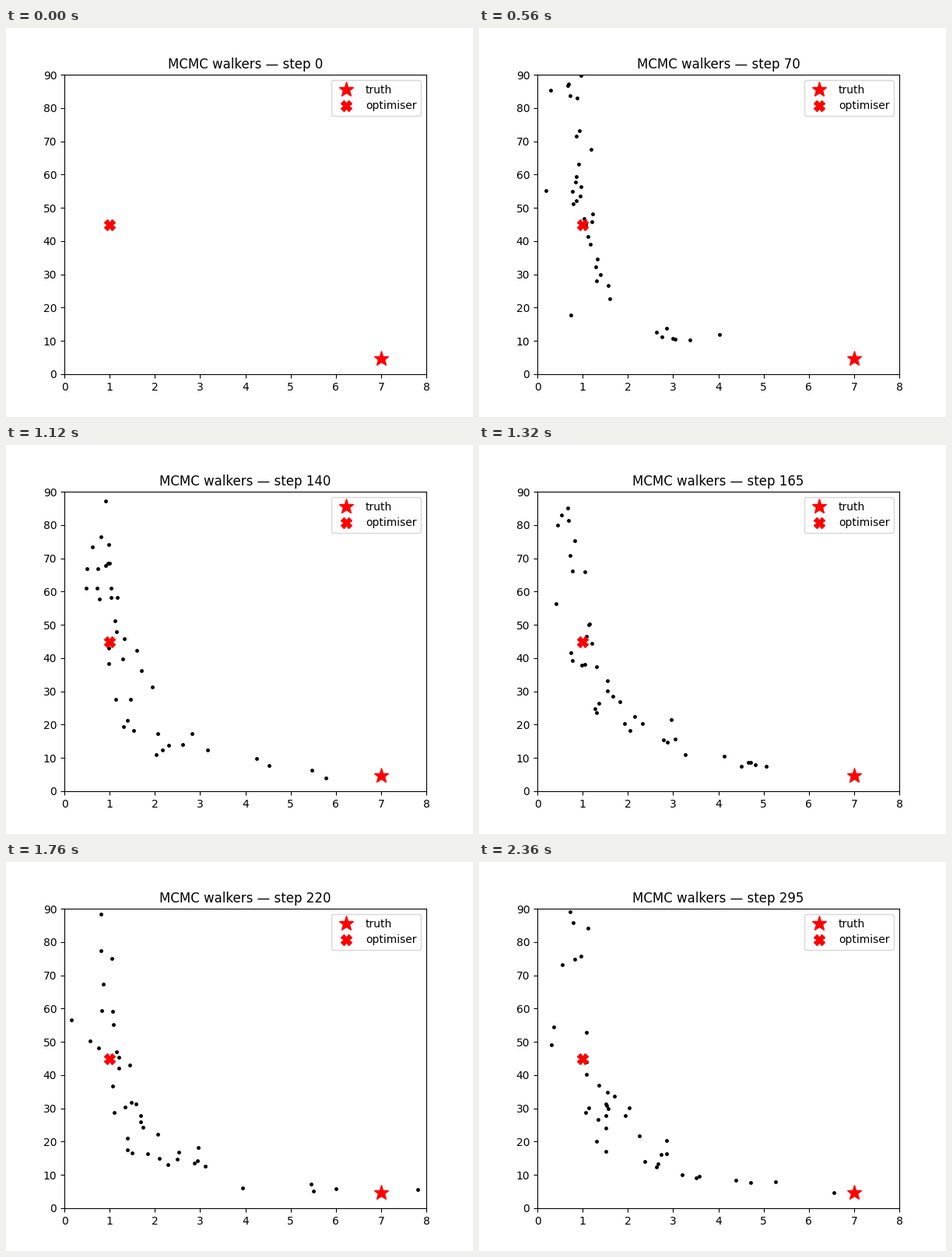
Animation of 600x500 px, one loop 2.4 s. Source, as a matplotlib script:

```python
import numpy as np
import matplotlib.pyplot as plt
from matplotlib.animation import FuncAnimation

FRAMES, INTERVAL = 60, 40
STRIDE = 5          # sampler steps per frame
WALKERS = 40
OPTIMISER = (1, 45)
TRUTH = (7, 4.7)


def log_prob(p):
    """Curved, degenerate ridge x ~ 0.3 + 35 / y, looser on its low side."""
    x, y = p.T
    inside = (x > 0) & (x < 8) & (y > 0) & (y < 90)
    y = np.where(inside, y, 1)
    ridge = 0.3 + 35 / y
    r = (x - ridge) / (0.22 * ridge)
    tail = np.where(r < 0, -2.5 * np.log1p(r**2 / 4), -r**2 / 2)
    lp = tail + 0.15 * np.log(y) - (3 / y) ** 4
    return np.where(inside, lp, -np.inf)


def stretch(movers, others, rng):
    """One affine-invariant stretch move of half the ensemble."""
    n = len(movers)
    z = (1 + rng.random(n)) ** 2 / 2
    partner = others[rng.integers(len(others), size=n)]
    proposal = partner + z[:, None] * (movers - partner)
    gain = np.log(z) + log_prob(proposal) - log_prob(movers)
    accept = np.log(rng.random(n)) < gain
    return np.where(accept[:, None], proposal, movers)


def run_chain(steps, seed=1):
    rng = np.random.default_rng(seed)
    p = np.array(OPTIMISER) + 0.01 * rng.standard_normal((WALKERS, 2))
    half = WALKERS // 2
    chain = [p]
    for _ in range(steps):
        a = stretch(p[:half], p[half:], rng)
        b = stretch(p[half:], a, rng)
        p = np.vstack([a, b])
        chain.append(p)
    return np.array(chain)


chain = run_chain(FRAMES * STRIDE)

fig, ax = plt.subplots(figsize=(6, 5), dpi=100)
dots, = ax.plot([], [], "k.", ms=5)
ax.plot(*TRUTH, "r*", ms=14, ls="none", label="truth", zorder=3)
ax.plot(*OPTIMISER, "rX", ms=10, ls="none", label="optimiser", zorder=3)
ax.set_xlim(0, 8)
ax.set_ylim(0, 90)
ax.legend(loc="upper right")
title = ax.set_title("")


def draw(frame):
    step = frame * STRIDE
    dots.set_data(*chain[step].T)
    title.set_text(f"MCMC walkers — step {step}")
    return dots, title


anim = FuncAnimation(fig, draw, frames=FRAMES, interval=INTERVAL, repeat=True)
plt.show()
```
